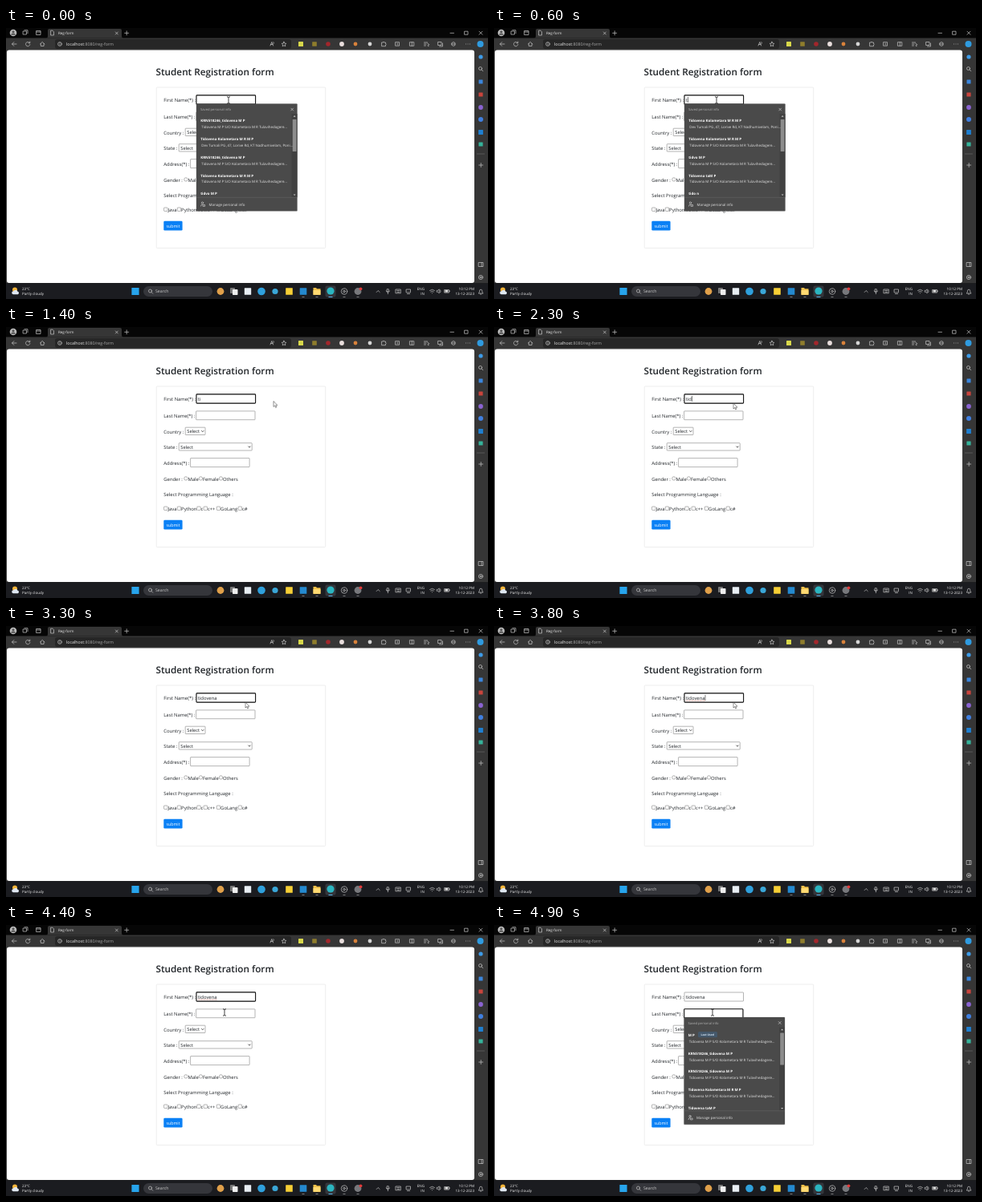
An HTML page for the animation above (5 s loop, 600 by 338 pixels).

```html
<!DOCTYPE html>
<html lang="en">
<head>
<meta charset="utf-8">
<title>Reg-form</title>
<style>
html, body { margin: 0; width: 100%; height: 100%; overflow: hidden; background: #060606; }
svg { display: block; width: 100%; height: 100%; }
text { font: 5.9px 'Open Sans', 'Noto Sans', sans-serif; fill: #212529; text-rendering: geometricPrecision; white-space: pre; }
.title { font-size: 11.75px; font-weight: 600; }
.bar text { font-size: 4.5px; fill: #eee; }
.bar .url { font-size: 5.25px; }
.bar .find { font-size: 5.2px; fill: #ccc; }
.end { text-anchor: end; }
.line { fill: none; stroke: #c8c8c8; stroke-width: .7; stroke-linecap: round; stroke-linejoin: round; }
.field { fill: #fff; stroke: #767676; stroke-width: .55; }
.focus { fill: #fff; stroke: #151515; stroke-width: 1.1; }
.opt { font-size: 5.7px; }
.pop text { font-size: 4.45px; fill: #e4e4e4; }
.pop .name { font-weight: 700; fill: #fff; }
.pop .head { font-size: 4.15px; fill: #b4b4b4; }
.pop .tag { font-size: 3.4px; font-weight: 700; fill: #d5e6f7; }

.step { animation: 5s step-end infinite; }
#popA { animation-name: popA; }
#popB { animation-name: popB; }
#listA { animation-name: before; }
#listB { animation-name: after; }
#hover { animation-name: hover; }
#focusA { animation-name: focusA; }
#focusB { animation-name: focusB; }
#squiggle { animation-name: squiggle; }
#beam { animation-name: beam; }
#arrow { animation-name: arrow; }
#mouse { animation: mouse 5s linear infinite; }
@keyframes popA { 0% { opacity: 1 } 27.6%, to { opacity: 0 } }
@keyframes popB { 0% { opacity: 0 } 91.6%, to { opacity: 1 } }
@keyframes before { 0% { opacity: 1 } 9.6%, to { opacity: 0 } }
@keyframes after { 0% { opacity: 0 } 9.6%, to { opacity: 1 } }
@keyframes hover { 0% { opacity: 0 } 25.6%, to { opacity: 1 } }
@keyframes focusA { 0% { opacity: 1 } 89.6%, to { opacity: 0 } }
@keyframes focusB { 0% { opacity: 0 } 89.6%, to { opacity: 1 } }
@keyframes squiggle { 0% { opacity: 0 } 69.6% { opacity: 1 } 89.6%, to { opacity: 0 } }
@keyframes beam { 0% { opacity: 1 } 21.6% { opacity: 0 } 81.6%, to { opacity: 1 } }
@keyframes arrow { 0% { opacity: 0 } 21.6% { opacity: 1 } 81.6%, to { opacity: 0 } }
@keyframes mouse {
  0% { transform: translate(277px, 90px); }
  15.6% { transform: translate(277px, 90px); animation-timing-function: steps(5); }
  25.6% { transform: translate(357px, 99.5px); animation-timing-function: step-end; }
  27.6% { transform: translate(333px, 92.5px); animation-timing-function: steps(4); }
  35.6% { transform: translate(298px, 95px); }
  75.6% { transform: translate(298px, 95px); animation-timing-function: steps(4); }
  83.6%, to { transform: translate(272px, 109px); }
}
</style>
</head>
<body>
<svg viewBox="0 0 600 338" preserveAspectRatio="none">
  <rect width="600" height="338" fill="#060606"/>

  <!-- browser frame -->
  <g class="bar">
    <path d="M0 12.5H600V318.5H0Z" fill="#363636"/>
    <path d="M50 12.5Q52 12.5 52 10.5V3Q52 1 54 1H142Q144 1 144 3V10.5Q144 12.5 146 12.5Z" fill="#363636"/>
    <rect x="61" y="14" width="294" height="12" rx="3" fill="#262626"/>
    <circle cx="9" cy="6" r="4.3" fill="#b9b9b9"/>
    <circle cx="9" cy="4.8" r="1.5" fill="#555"/>
    <path d="M6.3 8.8a2.7 2.2 0 0 1 5.4 0z" fill="#555"/>
    <g class="line">
      <path d="M21.5 4h4v4h-4zM23 2.7h4v4M38 3.5h5v5h-5zM38 5h5M56 3.2h2l1.5 1.5v4.3H56zM136.3 5l3 3m0-3l-3 3M147.7 6.3h5m-2.5-2.5v5"/>
      <path d="M553 6.3h4.5M571 4.2h4v4h-4zM589 4.2l4 4m0-4l-4 4"/>
      <path d="M13 20H7.5m2.3-2.4L7.5 20l2.3 2.4M29.5 18.6a2.7 2.7 0 1 0 .4 2M29.8 17v1.8H28M42.5 20l2.7-2.6L48 20M43.3 19.5v3h3.8v-3"/>
      <circle cx="67" cy="20" r="2.4"/>
      <path d="M67 19.8v1.3M67 18.6v.1M329 22l1.8-4.5L332.6 22M329.7 20.5h2.2M333 17.6q1 1 0 2"/>
      <path d="M346 17.2l.9 1.9 2 .3-1.5 1.4.4 2-1.8-1-1.8 1 .4-2-1.5-1.4 2-.3z"/>
      <path d="M468 18h1.4q.6-2 1.3 0h1.8v1.7q1.8.5 0 1.3v1.7H468zM485 17.7h4.5v4.5H485zM487.2 19v2"/>
      <path d="M502.8 17.7h5v4.6h-5zM505.3 17.7v4.6M520.5 18h4M520.5 20h2.5M520.5 22h2M525 19l.6 1.3 1.2.2-.9 1 .2 1.2-1.1-.6M538 17.5h4v4h-4zM539.5 23h4v-4M555 18.5q2-2 4 0v3q-2 2-4 0zM555 20h4M572.5 20h.1M575 20h.1M577.500 20h.1"/>
      <path d="M586.500 157h9" stroke="#666"/>
      <path d="M588.700 171h5m-2.500-2.500v5M588.500 292.500h5.500v5h-5.500zM592 292.500v5"/>
      <circle cx="591" cy="311" r="2.600"/><circle cx="591" cy="311" r=".9"/>
      <circle cx="590.500" cy="50.500" r="2"/><path d="M592 52l1.800 1.800"/>
    </g>
    <text x="65" y="8">Reg-form</text>
    <text class="url" x="75" y="21.900">localhost<tspan fill="#aaa">:8080/reg-form</tspan></text>
    <rect x="1" y="27.500" width="582" height="290.500" rx="3" fill="#fff"/>
  </g>

  <!-- taskbar -->
  <g class="bar">
    <rect y="318.500" width="600" height="19.500" fill="#1b1c20"/>
    <circle cx="11" cy="326.500" r="3" fill="#f4b53a"/>
    <path d="M9 332.300a2 2 0 0 1 .4-4 2.600 2.600 0 0 1 4.900.3 1.900 1.900 0 0 1 .4 3.700z" fill="#dfe7f0"/>
    <text x="20" y="326.800">23°C</text>
    <text x="20" y="333.200" fill="#bbb">Partly cloudy</text>
    <rect x="171" y="322" width="86" height="13" rx="6.500" fill="#35363b"/>
    <g class="line"><circle cx="179.500" cy="328" r="2"/><path d="M181 329.500l1.700 1.700"/></g>
    <text class="find" x="186" y="330.400">Search</text>
    <rect x="397.500" y="321.500" width="13" height="14" rx="2" fill="#34363c"/>
    <path d="M401.500 335.500h5" stroke="#5fb8f0" stroke-width="1"/>
    <path d="M368.500 335.500h3M385.500 335.500h3M419.500 335.500h3M436.500 335.500h3" stroke="#999" stroke-width=".8"/>
    <rect x="279" y="324" width="6" height="7" rx=".8" fill="#777"/>
    <rect x="282" y="326" width="6.500" height="7" rx=".8" fill="#eee"/>
    <path d="M382.500 324h3.500l1 1.300h4.500v7.500h-9z" fill="#f0c04a"/>
    <path d="M382.500 327h9v5.800h-9z" fill="#ffda72"/>
    <g class="line">
      <circle cx="421" cy="328.500" r="3.700"/><circle cx="421" cy="328.500" r="1.300"/>
      <path d="M461.200 329.500l2-2 2 2M474.500 325.700h1.800v3h-1.800zM473.300 328q2 4 4.200 0M475.400 330v1.700M485.300 326h6v4.800h-6zM486.700 327.600h3.200M487 329.400h2.700M498.500 326h5v3.800h-5zM499.500 331.500h3"/>
      <path d="M527.500 327.400q3-2.600 6 0M528.700 329q1.800-1.500 3.600 0M530.500 330.700h.1M536.600 327.300h1l1.600-1.500v5l-1.600-1.500h-1zM540.600 326.800q1 1.500 0 3M546 326.500h5.500v3.600H546zM552.300 327.700v1"/>
      <path d="M588.500 330.800q1-.8 1-3a1.600 1.600 0 0 1 3.200 0q0 2.200 1 3zM590.400 332h1.300"/>
    </g>
    <rect x="546.500" y="327" width="3.800" height="2.600" fill="#ddd"/>
    <text class="end" x="521" y="327">ENG</text>
    <text class="end" x="521" y="333.200">IN</text>
    <text class="end" x="583" y="327">10:12 PM</text>
    <text class="end" x="583" y="333.200">13-12-2023</text>
  </g>
  <g id="marks"></g>

  <!-- form -->
  <text class="title" x="186.500" y="58.800">Student Registration form</text>
  <rect x="187.200" y="74" width="210.500" height="200.500" rx="1" fill="none" stroke="#e2e2e2" stroke-width=".6"/>
  <text x="196.300" y="91.600">First Name(*) :</text>
  <text x="196.300" y="112.600">Last Name(*) :</text>
  <text x="196.300" y="132.600">Country :</text>
  <text x="196.300" y="151.600">State :</text>
  <text x="196.300" y="171.500">Address(*) :</text>
  <text x="196.300" y="191.500">Gender :</text>
  <text x="196.300" y="210.500">Select Programming Language :</text>
  <rect class="field" x="237" y="84" width="73.500" height="11" rx=".5"/>
  <rect class="field" x="236.600" y="104.900" width="73.400" height="10.800" rx=".5"/>
  <rect class="field" x="223.200" y="125.200" width="24.800" height="9.300" rx=".6"/>
  <rect class="field" x="215.200" y="144.700" width="91" height="9.300" rx=".6"/>
  <rect class="field" x="229.600" y="163.600" width="73.500" height="11" rx=".5"/>
  <rect id="focusA" class="focus step" x="237" y="83.900" width="73.600" height="11.200" rx=".9"/>
  <rect id="focusB" class="focus step" x="236.700" y="104.700" width="73.200" height="11.200" rx=".9"/>
  <text class="opt" x="225.300" y="132">Select</text>
  <text class="opt" x="217.300" y="151.500">Select</text>
  <path d="M243.300 129.200l1.500 1.500 1.500-1.500M301.500 148.700l1.500 1.500 1.500-1.500" fill="none" stroke="#222" stroke-width=".8"/>
  <g id="choices"></g>
  <rect x="196.300" y="240.700" width="23.300" height="11.900" rx="1.300" fill="#0a80f5"/>
  <text x="208" y="248.600" text-anchor="middle" style="font-size:5.300px;fill:#fff">submit</text>

  <text id="typed" x="238.800" y="91.600"></text>
  <rect id="caret" y="86" width=".6" height="7" fill="#222"/>
  <path id="squiggle" class="step" d="M238.800 93H263" stroke="#c4473a" stroke-width=".5" stroke-dasharray="1 .4"/>

  <g id="popA" class="pop step"></g>
  <g id="popB" class="pop step"></g>

  <g id="mouse">
    <path id="beam" class="step" d="M-2-4.200Q0-4.200 0-3.200Q0-4.200 2-4.200M0-3.200V3.200M-2 4.200Q0 4.200 0 3.200Q0 4.200 2 4.200" fill="none" stroke="#111" stroke-width=".8"/>
    <path id="arrow" class="step" d="M0 0V7L1.600 5.600 2.700 8 3.800 7.500 2.700 5.200H4.900Z" fill="#fff" stroke="#222" stroke-width=".5"/>
  </g>
</svg>
<script>
const $ = id => document.getElementById(id);

// plain marks standing for icons: x, y, half size, colour
const dots = [
  [401, 20, 2.8, '#a3262b'], [418, 20, 2.9, '#e9dedd'], [435, 20, 2.4, '#d9823b'], [453, 20, 2.4, '#d5d5d5'],
  [590.5, 20, 4, '#2f9be0'], [591, 36, 2.6, '#3d9be8'], [591, 99, 2.9, '#8a63d2'], [591, 114, 3, '#3f7fe0'],
  [267, 328.5, 4.4, '#e0a04a'], [318, 328.5, 4.8, '#2fa0dc'], [335, 328.5, 3.6, '#3aa7d8'],
  [404, 328, 4.6, '#2bb5c0'], [438, 328.5, 4.4, '#77787c'], [441.5, 325.3, 1.9, '#e23b3b']
];
const squares = [
  [367, 20, 3, '#d8d84a'], [384, 20, 2.8, '#8f7d2c'], [591, 67, 2.5, '#3a86dd'], [591, 83, 2.6, '#c9443c'],
  [591, 130, 2.9, '#1f7fd1'], [591, 145, 2.6, '#35b39a'], [161, 328.5, 4.6, '#27a4ec'],
  [301, 328.5, 4.2, '#e8eef4'], [352.5, 328.5, 4.3, '#f6cf35'], [370, 328.5, 4.3, '#2489cf']
];
$('marks').innerHTML =
  dots.map(([x, y, r, c]) => `<circle cx="${x}" cy="${y}" r="${r}" fill="${c}"/>`).join('') +
  squares.map(([x, y, r, c]) => `<rect x="${x - r}" y="${y - r}" width="${2 * r}" height="${2 * r}" rx=".5" fill="${c}"/>`).join('');

const radios = [['Male', 223.9], ['Female', 242.4], ['Others', 267.5]];
const checks = [['Java', 196.6], ['Python', 213.3], ['c', 237.8], ['c++', 246.1], ['GoLang', 262.3], ['c#', 289.2]];
$('choices').innerHTML =
  radios.map(([s, x]) => `<circle class="field" cx="${x}" cy="188.900" r="2.200"/><text x="${x + 2.5}" y="191.500">${s}</text>`).join('') +
  checks.map(([s, x]) => `<rect class="field" x="${x}" y="224" width="4.400" height="4.400" rx=".6"/><text x="${x + 4.8}" y="228.900">${s}</text>`).join('');

const word = 'tidovena';
const home = 'Tidovena M P S/O Kolametara M R Tulavihedagere...';
const flat = 'Dev Tumali PG ,47, Lorive Rd, KT Nadhumivelam, Poni...';
const code = 'KRN518246_tidovena M P';
const full = 'Tidovena Kolametara M R M P';

// rows of a saved-info list; the last one is cut off below its name
const rows = (list, top) => list.map(([name, sub], i) => {
  const y = top + i * 22.8;
  return `<text class="name" x="5.200" y="${y}">${name}</text>` +
    (i < 4 ? `<text x="6.300" y="${y + 7.9}">${sub}</text>` : '');
}).join('');

const panel = (x, y, body) => `<g transform="translate(${x} ${y})">
  <rect x="-.5" y="-.2" width="126.500" height="134.800" rx="1" fill="#000" opacity=".18"/>
  <rect width="125.500" height="133.800" rx=".8" fill="#4a4a4a"/>
  <rect x="118.500" y="12.500" width="7" height="104" fill="#414141"/>
  <rect x="119.700" y="19.500" width="4.800" height="40" rx=".5" fill="#8c8c8c"/>
  <path d="M120.600 16.300l1.500-1.700 1.500 1.700zM120.600 112.900l1.500 1.700 1.500-1.700z" fill="#c8c8c8"/>
  <text class="head" x="5" y="8.700">Saved personal info</text>
  ${body}
  <path class="line" d="M117.700 5.500l3 3m0-3l-3 3"/>
  <path d="M0 116.800H125.500" stroke="#6a6a6a" stroke-width=".5"/>
  <g class="line"><circle cx="7.500" cy="123.600" r="1.200"/><path d="M5.500 127.600q0-2.200 2-2.200M8.400 126h2.200v1.900H8.400z"/></g>
  <text x="15.500" y="127.400">Manage personal info</text></g>`;

$('popA').innerHTML = panel(237, 94.5,
  `<rect id="hover" class="step" x="114" y="2.500" width="10.500" height="9.500" rx="1" fill="#6b6b6b"/>
   <g id="listA" class="step">${rows([[code, home], [full, flat], [code, home], [full, home], ['tidvo M P']], 22.6)}</g>
   <g id="listB" class="step">${rows([[full, flat], [full, home], ['tidvo M P', home], ['Tidovena taM P', home], ['tido n']], 22.6)}</g>`);
$('popB').innerHTML = panel(236.5, 115,
  `<rect x="17.500" y="18" width="24" height="7.300" rx="1.500" fill="#44586b"/>
   <text class="tag" x="21" y="22.900">Last Used</text>
   ${rows([['M P', home], [code, home], [code, home], [full, home], ['Tidovena taM P']], 23.8)}`);

// typing and caret blink
const keys = [500, 800, 2200, 2350, 2450, 2550, 2650, 2740];
const start = performance.now();
const typed = $('typed'), caret = $('caret');

function draw(now) {
  const t = Math.floor((Math.max(0, now - start) + 20) / 100) * 100 % 5000;
  const n = keys.filter(k => k <= t).length;
  const last = n ? keys[n - 1] : -530;
  typed.textContent = word.slice(0, n);
  caret.setAttribute('x', 238.9 + (n ? typed.getComputedTextLength() : 0));
  caret.setAttribute('opacity', t < 4500 && (t - last) % 1060 < 530 ? 1 : 0);
  requestAnimationFrame(draw);
}
draw(start);
</script>
</body>
</html>
```
